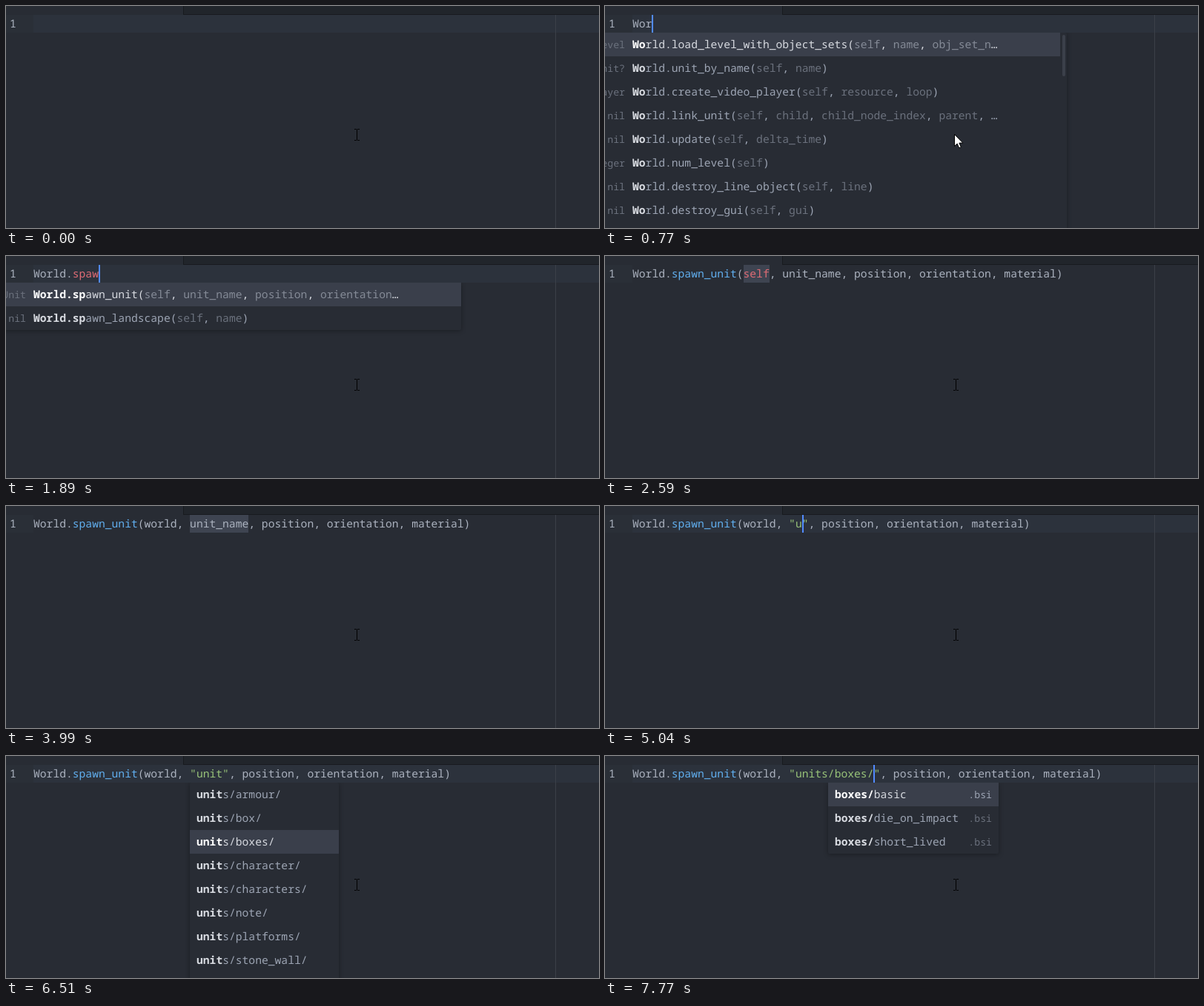
These frames come from a looping animation (800 px wide and 300 px high, 8000 ms). An HTML page with a canvas:

```html
<!DOCTYPE html>
<html lang="en">
<head>
<meta charset="utf-8">
<title>Editor autocomplete</title>
<style>
html, body { margin: 0; width: 100%; height: 100%; overflow: hidden; background: #282c34; }
canvas { display: block; }
</style>
</head>
<body>
<canvas id="stage" width="800" height="300"></canvas>
<script>
const ctx = document.getElementById('stage').getContext('2d');
const LOOP = 8000, LEFT = 37, TOP = 12, LINE = 24, ROW = 32;
const SIZE = 14.66, PITCH = SIZE * 0.6;
const FAMILY = '"Noto Sans Mono", "DejaVu Sans Mono", monospace';
const COLOR = {
  bg: '#282c34', line: '#2c323c', gutter: '#2a2f37', select: '#3e4451',
  text: '#abb2bf', red: '#e06c75', blue: '#61afef', green: '#98c379',
  item: '#9da5b4', bright: '#d7dae0', dim: '#6b717d', active: '#3a3f4b', cursor: '#528bff'
};

const METHODS = [
  ['Level', 'World.load_level_with_object_sets(self, name, obj_set_n…'],
  ['Unit?', 'World.unit_by_name(self, name)'],
  ['VideoPlayer', 'World.create_video_player(self, resource, loop)'],
  ['nil', 'World.link_unit(self, child, child_node_index, parent, …'],
  ['nil', 'World.update(self, delta_time)'],
  ['integer', 'World.num_level(self)'],
  ['nil', 'World.destroy_line_object(self, line)'],
  ['nil', 'World.destroy_gui(self, gui)']
];
const SPAWN = [
  ['Unit', 'World.spawn_unit(self, unit_name, position, orientation…'],
  ['nil', 'World.spawn_landscape(self, name)']
];
const FOLDERS = 'armour box boxes character characters note platforms stone_wall'
  .split(' ').map(name => ['', `units/${name}/`]);
const BOXES = ['basic', 'die_on_impact', 'short_lived'].map(name => ['', 'boxes/' + name, '.bsi']);

const methods = match => ({ x: -90, w: 704, h: 270, tx: LEFT, items: METHODS, match, bar: true });
const spawns = match => ({ x: -90, w: 704, h: 64, tx: LEFT, items: SPAWN, match });
const folders = { x: 248, w: 201, h: 270, tx: 257, items: FOLDERS, match: 'unit' };
const boxes = { x: 301, w: 230, h: 96, tx: 310, items: BOXES, match: 'boxes/' };

// "|" marks the caret, "[ ]" marks the selection
const call = args => `World.spawn_unit(${args}, position, orientation, material)`;
const unit = path => call(`world, "${path}|"`);
const steps = [
  [0, { text: '|', caret: false, popup: null, row: 0 }],
  [70, { caret: true }],
  [420, { text: 'W|' }],
  [630, { text: 'Wo|' }],
  [700, { popup: methods('Wo') }],
  [770, { text: 'Wor|' }],
  [840, { popup: methods('Wor') }],
  [980, { text: 'Worl|' }],
  [1050, { popup: methods('Worl') }],
  [1190, { text: 'World|' }],
  [1260, { popup: methods('World') }],
  [1400, { text: 'World.|' }],
  [1470, { popup: methods('World.') }],
  [1610, { text: 'World.s|' }],
  [1680, { text: 'World.sp|' }],
  [1750, { popup: spawns('World.sp') }],
  [1820, { text: 'World.spa|' }],
  [1890, { text: 'World.spaw|' }],
  [1960, { popup: spawns('World.spaw') }],
  [2240, { caret: false }],
  [2590, { text: call('[self], unit_name'), popup: null }],
  [3360, { text: call('w|, unit_name'), caret: true }],
  [3430, { text: call('wo|, unit_name') }],
  [3570, { text: call('wor|, unit_name') }],
  [3640, { text: call('worl|, unit_name') }],
  [3710, { text: call('world|, unit_name') }],
  [3990, { text: call('world, [unit_name]') }],
  [4480, { text: call('world, "[unit_name]"') }],
  [5040, { text: unit('u') }],
  [5180, { text: unit('un') }],
  [5250, { text: unit('uni') }],
  [5320, { text: unit('unit') }],
  [5390, { popup: folders }],
  [5810, { caret: false }],
  [6160, { caret: true }],
  [6230, { row: 1 }],
  [6440, { row: 2 }],
  [6510, { caret: false }],
  [6860, { text: unit('units/boxes'), popup: null, row: 0, caret: true }],
  [7280, { caret: false }],
  [7630, { text: unit('units/boxes/'), caret: true }],
  [7700, { popup: boxes }]
];

const stateAt = t => Object.assign({}, ...steps.filter(s => s[0] <= t).map(s => s[1]));
const colX = i => LEFT + i * PITCH;

function rect(x, y, w, h, color) {
  ctx.fillStyle = color;
  ctx.fillRect(x, y, w, h);
}

function write(str, x, y, color, bold = false, size = SIZE) {
  ctx.font = `${bold ? 700 : 400} ${size}px ${FAMILY}`;
  ctx.fillStyle = color;
  ctx.fillText(str, x, y);
}

function drawChrome() {
  rect(0, 0, 800, 300, COLOR.bg);
  rect(239, 0, 561, 11, '#21252b');
  rect(239, 11, 561, 1, '#181a1f');
  rect(239, 0, 1, 12, '#181a1f');
  rect(0, TOP, LEFT, LINE, COLOR.gutter);
  write('1', 5, 29, COLOR.text);
}

function tokenColor(tok, prev, next) {
  if (tok[0] === '"') return COLOR.green;
  if (!/\w/.test(tok)) return COLOR.text;
  if (next === '(') return COLOR.blue;
  return tok === 'self' || prev === '.' ? COLOR.red : COLOR.text;
}

function drawLine({ text, caret }) {
  const from = text.indexOf('['), to = text.indexOf(']') - 1;
  const plain = text.replace(/[|[\]]/g, '');
  if (from < 0) rect(LEFT, TOP, 800 - LEFT, LINE, COLOR.line);
  else {
    const x = Math.round(colX(from));
    rect(x, TOP, Math.round(colX(to)) - x, LINE, COLOR.select);
  }
  rect(741, TOP, 1, 288, '#3b4048');
  for (const { 0: tok, index } of plain.matchAll(/"[^"]*"|\w+|[^\w"]+/g)) {
    const color = tokenColor(tok, plain[index - 1], plain[index + tok.length]);
    write(tok, colX(index), 29, color);
  }
  if (caret && from < 0) rect(Math.round(colX(text.indexOf('|'))), TOP, 2, LINE, COLOR.cursor);
}

function drawItem([type, label, ext], popup, y, active) {
  const base = active ? COLOR.bright : COLOR.item;
  const n = popup.match.length, paren = label.indexOf('(');
  ctx.textAlign = 'right';
  write(type, 27, y, COLOR.dim, false, SIZE * 0.9);
  if (ext) write(ext, popup.x + popup.w - 9, y, active ? COLOR.item : COLOR.dim, false, SIZE * 0.9);
  ctx.textAlign = 'left';
  write(label.slice(0, n), popup.tx, y, active ? '#ffffff' : COLOR.bright, true);
  for (const { 0: tok, index } of label.slice(n).matchAll(/\w+|[^\w]+/g)) {
    const param = paren >= 0 && index + n > paren && /\w/.test(tok);
    const color = param ? (active ? '#858b97' : COLOR.dim) : base;
    write(tok, popup.tx + (index + n) * PITCH, y, color);
  }
}

function drawPopup(popup, row) {
  const { x, w, h, items, bar } = popup;
  const y = TOP + LINE, full = bar ? w + 9 : w;
  ctx.save();
  ctx.beginPath();
  ctx.rect(0, y, 800, 300);
  ctx.clip();
  ctx.shadowColor = 'rgba(0,0,0,0.35)';
  ctx.shadowBlur = 6;
  ctx.shadowOffsetY = 1;
  ctx.fillStyle = COLOR.bg;
  ctx.beginPath();
  ctx.roundRect(x, y, full, h, 2);
  ctx.fill();
  ctx.restore();
  rect(x, y + row * ROW, w, ROW, COLOR.active);
  if (bar) {
    ctx.fillStyle = '#3b404a';
    ctx.beginPath();
    ctx.roundRect(617, 39, 4, 56, 2);
    ctx.fill();
  }
  items.forEach((item, i) => drawItem(item, popup, 57 + i * ROW, i === row));
}

function drawPointer(arrow) {
  if (!arrow) {
    rect(473, 167, 1, 14, '#000');
    for (const y of [166, 181]) {
      rect(470, y, 3, 1, '#000');
      rect(474, y, 3, 1, '#000');
    }
    return;
  }
  const pts = [[0, 0], [0, 16], [3.7, 12.6], [6.2, 18.3], [8.8, 17.2], [6.4, 11.6], [11.3, 11.6]];
  ctx.beginPath();
  pts.forEach(([x, y]) => ctx.lineTo(471.5 + x, 173.5 + y));
  ctx.closePath();
  ctx.fillStyle = '#fff';
  ctx.fill();
  ctx.strokeStyle = '#000';
  ctx.lineWidth = 1;
  ctx.stroke();
}

function frame(now) {
  const state = stateAt(now % LOOP);
  drawChrome();
  drawLine(state);
  if (state.popup) drawPopup(state.popup, state.row);
  drawPointer(state.popup && state.popup.bar);
  requestAnimationFrame(frame);
}

ctx.textRendering = 'geometricPrecision';
ctx.textBaseline = 'alphabetic';
frame(performance.now());
</script>
</body>
</html>
```
